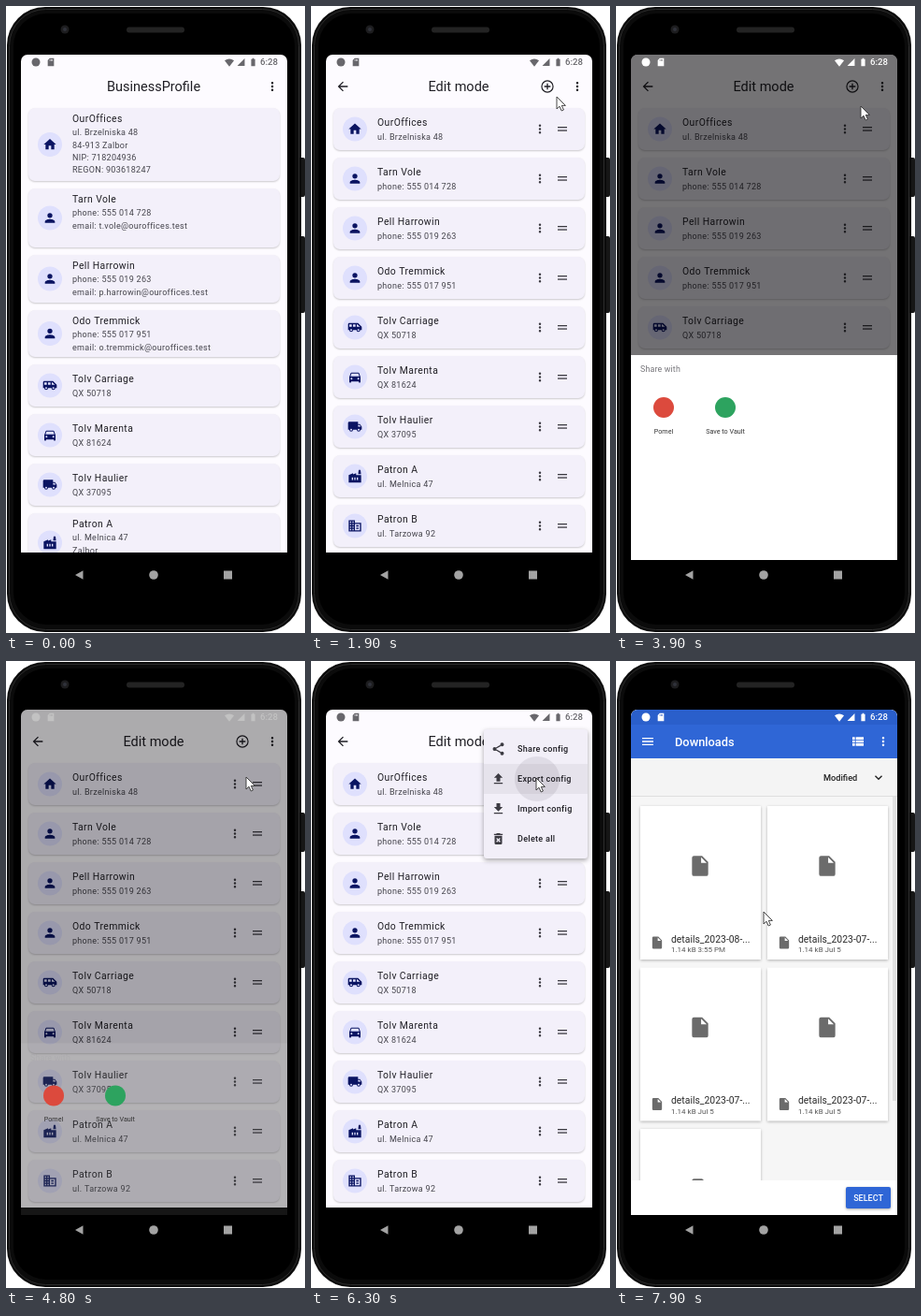
An HTML page with a canvas that plays this animation: 320 by 670 pixels, repeating every 8 s.

```html
<!DOCTYPE html>
<html lang="en">
<head>
<meta charset="utf-8">
<title>Business profile app</title>
<style>
html, body { margin: 0; width: 100%; height: 100%; overflow: hidden; background: #fff; }
canvas { display: block; width: 320px; height: 670px; }
</style>
</head>
<body>
<canvas id="stage"></canvas>
<script>
const W = 320, H = 670, LOOP = 8000;
const canvas = document.getElementById('stage');
const c = canvas.getContext('2d');
const dpr = window.devicePixelRatio || 1;
canvas.width = W * dpr;
canvas.height = H * dpr;

const INK = '#1f1e24', SUB = '#45444c', NAVY = '#0a1462', BLUE = '#2f66d6';
const L = 16, R = 301, TOP = 52, APP = 584, FULL = 592;

const clamp = v => Math.max(0, Math.min(1, v));
const ramp = (t, a, b) => clamp((t - a) / (b - a));
const out = p => 1 - (1 - p) ** 3;
const smooth = p => p * p * (3 - 2 * p);

// Icons on a 24 unit grid, filled with the even-odd rule
const ring = (x, y, r) =>
  `M${x - r} ${y}a${r} ${r} 0 1 0 ${2 * r} 0a${r} ${r} 0 1 0 ${-2 * r} 0z`;
const ICONS = {
  home: 'M10 20v-6h4v6h5v-8h3L12 3 2 12h3v8z',
  person: ring(12, 8, 4) + 'M4 20v-2c0-2.7 5.3-4 8-4s8 1.3 8 4v2z',
  bus: 'M3 5h14l6 6v5h-2.5a3 3 0 0 1-6 0H9a3 3 0 0 1-6 0H1V7q0-2 2-2zM3 7v4h4V7zM9 7v4h4V7zM15 7v4h5l-4-4z'
    + ring(6, 16, 1.5) + ring(17.5, 16, 1.5),
  car: 'M6.5 5h11q1 0 1.4 1L21 12v8q0 1-1 1h-1q-1 0-1-1v-1H6v1q0 1-1 1H4q-1 0-1-1v-8l2.1-6q.4-1 1.4-1zM6.5 6.5L5 11h14l-1.5-4.5z'
    + ring(6.5, 14.5, 1.5) + ring(17.5, 14.5, 1.5),
  truck: 'M3 4h14v4h3l3 4v5h-2a3 3 0 0 1-6 0H9a3 3 0 0 1-6 0H1V6q0-2 2-2zM17 9.5V12h4.5l-2-2.5z'
    + ring(6, 17, 1.5) + ring(18, 17, 1.5),
  factory: 'M22 10v12H2V10l7-3v2l5-2v3zM17.2 8.5L18 2h3l.8 6.5zM7 14v4h2v-4zM11 14v4h2v-4zM15 14v4h2v-4z',
  office: 'M2 3h10v4h10v14H2zM12 9v10h8V9z'
    + [5, 9, 13, 17].map(y => `M4 ${y}h2v2h-2zM8 ${y}h2v2h-2z`).join('')
    + 'M14 11h4v2h-4zM14 15h4v2h-4z',
  back: 'M20 11H7.8l5.6-5.6L12 4l-8 8 8 8 1.4-1.4L7.8 13H20z',
  add: ring(12, 12, 10) + ring(12, 12, 8.2) + 'M11 7h2v4h4v2h-4v4h-2v-4H7v-2h4z',
  more: ring(12, 6, 2) + ring(12, 12, 2) + ring(12, 18, 2),
  share: ring(18, 5, 3) + ring(6, 12, 3) + ring(18, 19, 3)
    + 'M8.1 9.6l6.8-3.9 1 1.7-6.8 4zM8.1 14.4l6.8 3.9 1-1.7-6.8-4z',
  upload: 'M5 18h14v2H5zM5 10h4v6h6v-6h4l-7-7z',
  download: 'M5 18h14v2H5zM19 9h-4V3H9v6H5l7 7z',
  trash: 'M6 7h12v12q0 2-2 2H8q-2 0-2-2zM5 4h3.5l1-1h5l1 1H19v2H5zM8.5 11.9l2.1 2.1-2.1 2.1 1.4 1.4 2.1-2.1 2.1 2.1 1.4-1.4-2.1-2.1 2.1-2.1-1.4-1.4-2.1 2.1-2.1-2.1z',
  pencil: 'M3 17.2V21h3.8L17.8 9.9l-3.7-3.7zM20.7 7q.6-.7 0-1.4l-2.3-2.3q-.7-.6-1.4 0l-1.9 1.8 3.8 3.8z',
  folder: 'M10 4H4q-2 0-2 2v12q0 2 2 2h16q2 0 2-2V8q0-2-2-2h-8zM4 8h16v10H4z',
  file: 'M6 2h8l6 6v12q0 2-2 2H6q-2 0-2-2V4q0-2 2-2zM13 3.5V9h5.5z',
  menu: 'M3 6h18v2H3zM3 11h18v2H3zM3 16h18v2H3z',
  list: 'M3 5h4v4H3zM8.5 5H21v4H8.5zM3 10h4v4H3zM8.5 10H21v4H8.5zM3 15h4v4H3zM8.5 15H21v4H8.5z',
  down: 'M7.4 8.6L12 13.2l4.6-4.6L18 10l-6 6-6-6z',
  wifi: 'M12 21L1 7Q12-1 23 7z',
  signal: 'M2 22L22 2v20z',
  battery: 'M10 2h4v2h3v18H7V4h3z',
  sd: 'M9 2h11v20H4V7zM9 5v4h1.5V5zM12 5v4h1.5V5zM15 5v4h1.5V5z'
};
for (const k in ICONS) ICONS[k] = new Path2D(ICONS[k]);

function icon(name, x, y, size, color) {
  c.save();
  c.translate(x - size / 2, y - size / 2);
  c.scale(size / 24, size / 24);
  c.fillStyle = color;
  c.fill(ICONS[name], 'evenodd');
  c.restore();
}
function rect(x, y, w, h, color) {
  c.fillStyle = color;
  c.fillRect(x, y, w, h);
}
function round(x, y, w, h, r, fill, stroke) {
  c.beginPath();
  c.roundRect(x, y, w, h, r);
  if (fill) { c.fillStyle = fill; c.fill(); }
  if (stroke) { c.strokeStyle = stroke; c.lineWidth = 1; c.stroke(); }
}
function disc(x, y, r, color) {
  c.beginPath();
  c.arc(x, y, r, 0, 7);
  c.fillStyle = color;
  c.fill();
}
// y is the middle of the capitals
function text(s, x, y, size, color, { weight = 400, gap = 0, align = 'left' } = {}) {
  c.font = `${weight} ${size}px Roboto, sans-serif`;
  c.letterSpacing = gap + 'px';
  c.textAlign = align;
  c.fillStyle = color;
  c.fillText(s, x, y + size * 0.36);
}
function shadow(blur, dy, alpha, draw) {
  c.save();
  c.shadowColor = `rgba(0,0,0,${alpha})`;
  c.shadowBlur = blur * dpr;
  c.shadowOffsetY = dy * dpr;
  draw();
  c.restore();
}
function faded(alpha, draw) {
  if (alpha <= 0) return;
  c.save();
  c.globalAlpha = alpha;
  draw();
  c.restore();
}
function clip(x, y, w, h, draw) {
  c.save();
  c.beginPath();
  c.rect(x, y, w, h);
  c.clip();
  draw();
  c.restore();
}

// icon, card height, title, lines
const ENTRIES = [
  ['home', 78, 'OurOffices', 'ul. Brzelniska 48', '84-913 Zalbor', 'NIP: 718204936', 'REGON: 903618247'],
  ['person', 63, 'Tarn Vole', 'phone: 555 014 728', 'email: t.vole@ouroffices.test'],
  ['person', 51, 'Pell Harrowin', 'phone: 555 019 263', 'email: p.harrowin@ouroffices.test'],
  ['person', 50, 'Odo Tremmick', 'phone: 555 017 951', 'email: o.tremmick@ouroffices.test'],
  ['bus', 45, 'Tolv Carriage', 'QX 50718'],
  ['car', 45, 'Tolv Marenta', 'QX 81624'],
  ['truck', 45, 'Tolv Haulier', 'QX 37095'],
  ['factory', 63, 'Patron A', 'ul. Melnica 47', 'Zalbor'],
  ['office', 63, 'Patron B', 'ul. Tarzowa 92', 'Zalbor']
];

function card(entry, y, h, editing) {
  const [glyph, , title, ...lines] = entry;
  shadow(2, 1, 0.2, () => round(24, y, 269, h, 7, '#f3f0fa'));
  disc(47, y + h / 2, 13, '#dfe0fd');
  icon(glyph, 47, y + h / 2, 16, NAVY);
  const ty = y + (h > 46 ? 11 : 15.3);
  text(title, 71, ty, 10.4, INK, { gap: 0.42 });
  (editing ? lines.slice(0, 1) : lines).forEach((s, i) =>
    text(s, 71, ty + 15 + i * 13.4, 9, SUB, { gap: 0.3 }));
  if (editing) {
    icon('more', 245, y + 22.5, 15, '#3c3b42');
    rect(264, y + 20, 10, 1.3, '#3c3b42');
    rect(264, y + 23.4, 10, 1.3, '#3c3b42');
  }
}

function app(editing) {
  rect(L, TOP, R - L, APP - TOP, '#fdfbff');
  text(editing ? 'Edit mode' : 'BusinessProfile', 158, 86, 14.5, INK, { align: 'center' });
  icon('more', 285, 86, 15, INK);
  if (editing) {
    icon('back', 34, 86, 16, INK);
    icon('add', 253, 86, 16, INK);
  }
  clip(L, 104, R - L, APP - 104, () => {
    let y = 109;
    for (const e of ENTRIES) {
      const h = editing ? 45 : e[1];
      card(e, y, h, editing);
      y += h + 8;
    }
  });
}

function status(color) {
  disc(32, 60, 4.5, color);
  icon('sd', 48, 60, 10, color);
  icon('wifi', 239, 60.5, 11, color);
  icon('signal', 251.5, 60, 9.5, color);
  icon('battery', 264.5, 60, 10, color);
  text('6:28', 272, 60, 9.6, color, { weight: 500 });
}

const MAIN_MENU = [['pencil', 'Edit mode']];
const EDIT_MENU = [
  ['share', 'Share config'], ['upload', 'Export config'],
  ['download', 'Import config'], ['trash', 'Delete all']
];
// items, opens, closes
const MENUS = [[MAIN_MENU, 900, 1680], [EDIT_MENU, 2300, 3580], [EDIT_MENU, 5500, 6500]];

function menu(t, [items, start, end], [px, py]) {
  const grow = out(ramp(t, start, start + 300));
  faded(ramp(t, start, start + 120) * (1 - ramp(t, end, end + 200)), () => {
    const full = items.length * 32 + 10;
    const h = full * grow;
    shadow(5, 2, 0.35, () => round(185, 73, 111, h, 3, '#f2eff8'));
    clip(185, 73, 111, h, () => items.forEach(([glyph, label], i) => {
      const y = 94 + i * 32;
      if (px > 185 && Math.floor((py - 78) / 32) === i) {
        rect(185, y - 16, 111, 32, '#e6e3ec');
        const press = ramp(t, end - 260, end);
        if (press > 0) disc(px + 1, y, 10 + press * 60, 'rgba(60,55,70,.1)');
      }
      faded(ramp(grow, i * 0.2, i * 0.2 + 0.25), () => {
        icon(glyph, 200.5, y, 16, '#3c3b42');
        text(label, 221, y, 9, INK, { weight: 500, gap: 0.3 });
      });
    }));
  });
}

function sheet(t) {
  const open = out(ramp(t, 3600, 3880));
  const shut = ramp(t, 4600, 4850);
  const y = 373 + (1 - open) * 219 + shut * 44;
  if (open === 0 || shut === 1) return;
  faded((1 - shut) ** 1.5, () => clip(L, TOP, R - L, FULL - TOP, () => {
    rect(L, y, R - L, 230, '#fff');
    text('Share with', 26, y + 15, 8.9, '#76757a', { gap: 0.15 });
    faded(ramp(t, 3750, 3880), () => {
      disc(51, y + 56, 11, '#dc4a3d');
      disc(117, y + 56, 11, '#2da35f');
      text('Pomel', 51, y + 81, 7.2, '#333', { align: 'center' });
      text('Save to Vault', 117, y + 81, 7.2, '#333', { align: 'center' });
    });
  }));
}

function dialog(t) {
  const p = ramp(t, 6600, 6800);
  faded(p * 0.54, () => rect(L, TOP, R - L, APP - TOP, '#000'));
  faded(p, () => {
    shadow(6, 3, 0.4, () => round(66, 207, 185, 237, 15, '#eeebfa'));
    text('Export details', 81, 234, 16, INK);
    text('Select folder', 81, 271, 9, INK, { gap: 0.3 });
    faded(ramp(t, 7200, 7320), () => disc(151, 271, 11, 'rgba(60,58,70,.16)'));
    icon('folder', 151, 270.5, 16, '#3c3b42');
    round(81.5, 287.5, 153, 40, 2, null, '#d6d3e0');
    text('Path', 89, 307.5, 10.4, '#aba8b3', { gap: 0.35 });
    round(81.5, 338.5, 153, 42, 2, null, '#77757f');
    text('File name', 89, 360, 10.4, SUB, { gap: 0.35 });
    text('Cancel', 89, 413, 9, '#4153c0', { weight: 500, gap: 0.1 });
    text('Approve', 227, 413, 9, '#4153c0', { weight: 500, gap: 0.1, align: 'right' });
  });
}

function fileCard(x, y, name, info) {
  shadow(3, 1, 0.28, () => rect(x, y, 129, 164, '#fff'));
  icon('file', x + 64, y + 64, 26, '#6b6b6b');
  icon('file', x + 18, y + 146, 15.5, '#6b6b6b');
  text(name, x + 33, y + 142, 10.4, '#2a2a2a');
  text(info, x + 33, y + 153.5, 8, '#555');
}

function picker(t) {
  const p = ramp(t, 7600, 7840);
  faded(p, () => clip(L, TOP, R - L, FULL - TOP, () => {
    c.translate(0, 40 * (1 - out(p)));
    rect(L, TOP, R - L, FULL - TOP, '#f6f6f6');
    clip(L, 145, R - L, 410, () => {
      for (let i = 0; i < 5; i++) {
        const x = i % 2 ? 162 : 26, y = 155 + Math.floor(i / 2) * 172.5;
        fileCard(x, y, i ? 'details_2023-07-...' : 'details_2023-08-...',
          i ? '1.14 kB Jul 5' : '1.14 kB 3:55 PM');
      }
      rect(296, 145, 4, 325, '#e2e2e2');
    });
    rect(L, TOP, R - L, 16, '#2a5fcb');
    rect(L, 68, R - L, 36, BLUE);
    icon('menu', 34, 86, 16, '#fff');
    text('Downloads', 63, 86.5, 12.8, '#fff', { weight: 500 });
    icon('list', 259, 86, 16, '#fff');
    icon('more', 286, 86, 15, '#fff');
    rect(L, 104, R - L, 40, '#f4f4f4');
    rect(L, 144, R - L, 1, '#dedede');
    text('Modified', 222, 125, 9.2, '#222', { weight: 500 });
    icon('down', 281, 124.5, 16, '#222');
    rect(L, 555, R - L, 37, '#fff');
    shadow(3, 1, 0.35, () => round(246, 562, 48, 23, 2, BLUE));
    text('SELECT', 270, 574, 9, '#fff', { weight: 500, align: 'center' });
    status('#fff');
  }));
}

// time, x, y of the pointer
const PATH = [
  [100, 314, 200], [800, 285, 88], [1000, 285, 88], [1400, 263, 97], [1900, 263, 97],
  [2200, 285, 87], [2750, 285, 87], [3200, 262, 107], [4100, 262, 107], [4550, 257, 124],
  [4900, 257, 124], [5400, 285, 88], [5800, 285, 88], [6200, 241, 125], [6800, 241, 125],
  [7300, 153, 270], [7600, 153, 270], [7800, 158, 268]
];
function pointerAt(t) {
  const i = PATH.findIndex(k => k[0] > t);
  if (i < 0) return PATH[PATH.length - 1].slice(1);
  const a = PATH[Math.max(0, i - 1)], b = PATH[i];
  const p = smooth(ramp(t, a[0], b[0]));
  return [a[1] + (b[1] - a[1]) * p, a[2] + (b[2] - a[2]) * p];
}
const ARROW = new Path2D('M0 0V13L3 10.2 5.2 15 7.4 14 5.3 9.4H9.4z');
function pointer([x, y]) {
  c.save();
  c.translate(x, y);
  c.fillStyle = '#fff';
  c.strokeStyle = '#333';
  c.lineWidth = 0.9;
  c.fill(ARROW);
  c.stroke(ARROW);
  c.restore();
}

function ripple(t, at, x, y) {
  const p = ramp(t, at, at + 300);
  if (p > 0 && p < 1) disc(x, y, 4 + 10 * out(p), `rgba(40,36,50,${0.13 * (1 - p)})`);
}

function phone() {
  rect(0, 0, W, H, '#fff');
  round(313, 162, 7, 42, 2, '#161616');
  round(313, 246, 7, 82, 2, '#161616');
  round(1, 1, 315, 668, 41, '#0b0b0b');
  round(3.5, 3.5, 310, 663, 39, null, '#2c2c2c');
  round(8, 8, 301, 653, 35, '#000');
  disc(63, 25, 4.5, '#1d1d1f');
  disc(63, 25, 2, '#30323a');
  round(129, 22.5, 62, 6, 3, '#232323');
}

function navBar() {
  const gray = '#a3a3a3';
  c.beginPath();
  c.moveTo(74, 608);
  c.lineTo(82.5, 603.3);
  c.lineTo(82.5, 612.7);
  c.fillStyle = gray;
  c.fill();
  disc(158, 608, 4.8, gray);
  rect(233, 603.5, 9, 9, gray);
}

function draw(t) {
  const at = pointerAt(t);
  c.setTransform(dpr, 0, 0, dpr, 0, 0);
  phone();
  navBar();
  c.save();
  c.beginPath();
  c.roundRect(L, TOP, R - L, FULL - TOP, [7, 7, 0, 0]);
  c.clip();
  app(t >= 1900);
  for (const click of [800, 2200, 5400]) ripple(t, click, 285, 86);
  const dim = ramp(t, 3600, 3850) * (1 - ramp(t, 4600, 5100));
  if (t < 3600 || t > 5100) {
    status('#68676c');
    for (const m of MENUS) if (t >= m[1]) menu(t, m, at);
  } else {
    menu(t, MENUS[1], at);
    faded(dim * 0.54, () => rect(L, TOP, R - L, APP - TOP, '#000'));
    const g = Math.round(104 + 151 * dim);
    status(`rgb(${g},${g},${g})`);
    sheet(t);
  }
  dialog(t);
  picker(t);
  c.restore();
  if (t >= 100) pointer(at);
}

function frame(now) {
  draw(now % LOOP);
  requestAnimationFrame(frame);
}
requestAnimationFrame(frame);
</script>
</body>
</html>
```
